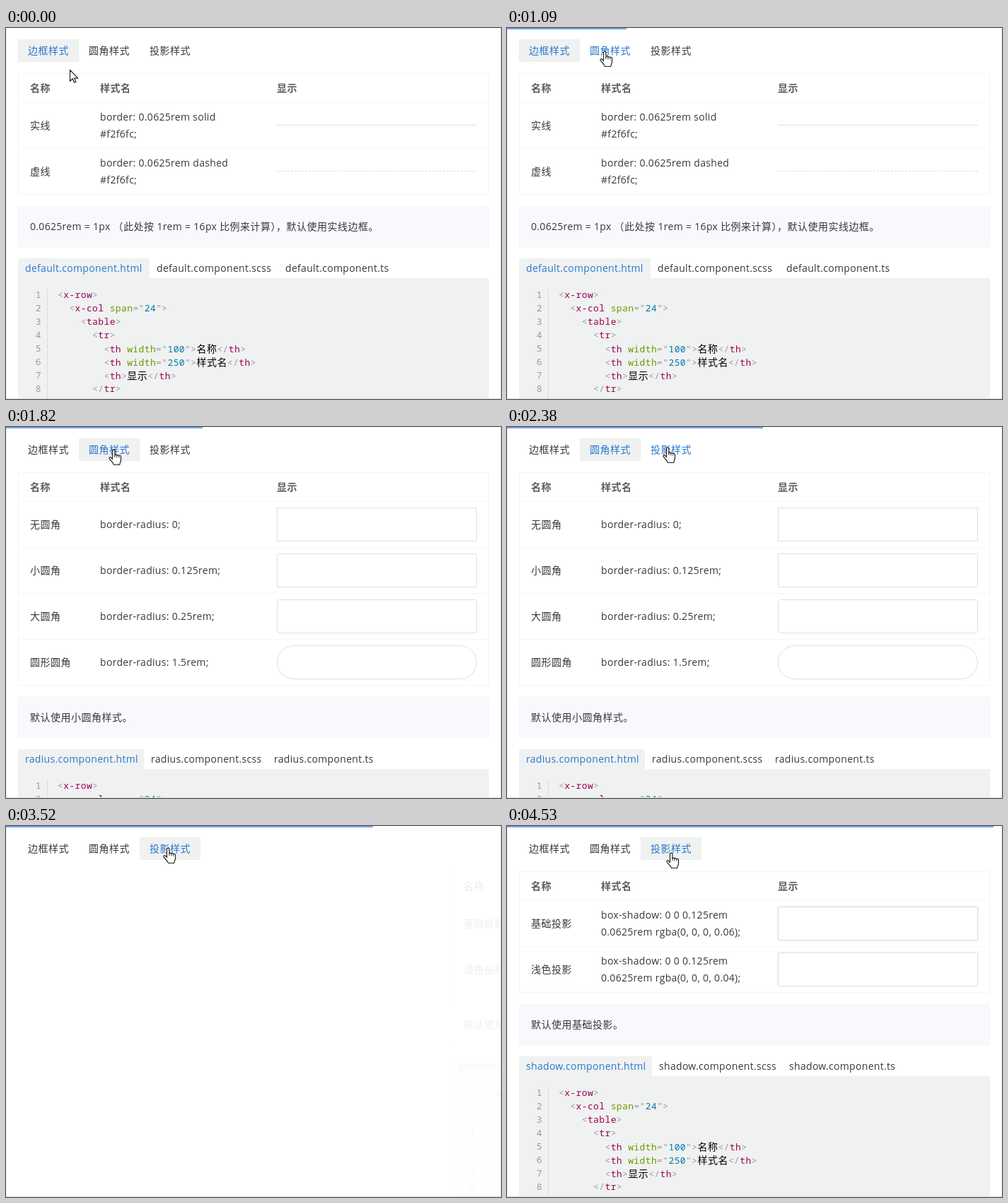
Animation of 700 by 525 pixels, one loop 4610 ms. Source, as an HTML page:

```html
<!DOCTYPE html>
<html lang="zh-CN">
<head>
<meta charset="utf-8">
<title>样式说明</title>
<style>
  html, body { margin: 0; width: 100%; height: 100%; overflow: hidden; background: #fff; }
  #stage { position: relative; width: 700px; height: 525px; overflow: hidden; background: #fff;
    font: 14px/24px "Open Sans", "Noto Sans CJK SC", "Noto Sans CJK", sans-serif; letter-spacing: .5px; color: #383838; }
  #stage div, #stage svg { position: absolute; box-sizing: border-box; }
  #stage svg { overflow: visible; left: 0; top: 0; }
  .text { white-space: pre; }
  .text i { font-style: normal; letter-spacing: .31px; }
  .head { font-weight: 700; color: #5c5c5c; }
  .blue { color: #2878d0; }
  .panel { inset: 0; }
  .table { left: 17px; top: 64px; width: 666px; border: 1px solid #f2f5fa; }
  .rule { left: 17px; width: 666px; height: 1px; background: #f2f5fa; }
  .show { left: 383px; width: 283px; border: 0 solid #dcdfe6; }
  .note { left: 17px; width: 666px; height: 58px; background: #f7f9fd; border: 1px solid #f2f6fc; border-radius: 2px; }
  .fill { background: #f0f1f1; }
  .code { white-space: pre; line-height: 19px; font-size: 13px; letter-spacing: .38px;
    font-family: "Noto Sans Mono", "Noto Sans CJK SC", monospace; color: #999; }
  .num { text-align: right; width: 34px; }
  .tag { color: #905; } .attr { color: #690; } .val { color: #07a; }
  .zh { color: #000; font-size: 14px; letter-spacing: .5px; }
  .tab { top: 16px; width: 86px; height: 32px; border-radius: 2px; }
  .tab span { position: absolute; left: 14px; top: 4px; white-space: nowrap; }
  .tab.on { background: #f0f1f1; box-shadow: inset 0 0 0 1px #eceeee; }
  #dot { width: 8px; height: 8px; border-radius: 50%; background: #2878d0; opacity: .55; filter: blur(.8px); }
  #bar { left: 0; top: 0; height: 2px; background: #74a6e6; }
  #frame { inset: 0; border: 1px solid #ececec; border-top: 0; border-bottom-color: #dcdee0; }
  path { fill: #fff; stroke: #222; stroke-width: 1.2; stroke-linejoin: round; }
  path.line { fill: none; stroke-width: 1; }
</style>
</head>
<body>
<div id="stage">
  <div id="panels"></div>
  <div id="tabs"></div>
  <div id="frame"></div>
  <div id="bar"></div>
  <div id="dot"></div>
  <svg id="arrow" width="12" height="19"><path d="M.5.5v15.8l3.7-3.6 2.3 5.6 2.4-1-2.3-5.4h5.2z"/></svg>
  <svg id="hand" width="18" height="24">
    <path d="M5.5 14.5V2.8a1.7 1.7 0 0 1 3.4 0V9a1.6 1.6 0 0 1 3 .4 1.6 1.6 0 0 1 2.9.6 1.5 1.5 0 0 1 2.7 1v5c0 2.5-1.5 3.5-1.8 6.5H7.5C7 20 3.5 17 1.2 13.8c-.9-1.5.9-2.8 2.2-1.6z"/>
    <path class="line" d="M8.9 9v3M11.9 9.6v2.8M14.8 10.4v2.2"/>
  </svg>
</div>
<script>
const $ = id => document.getElementById(id);
const LOOP = 4610, STEPS = 58, SLIDE = 360;
const tabNames = ['边框样式', '圆角样式', '投影样式'];
const line = 'border-top-width:1px;height:1px;border-top-style:';
const box = 'height:48px;border-width:1px;border-radius:';
const shadow = a => box + `2px;box-shadow:0 0 2px 1px rgba(0,0,0,${a})`;

const pages = [
  { name: 'default', tabs: [17, 203, 385], start: 0,
    note: '0.0625rem = 1px （此处按 1rem = 16px 比例来计算），默认使用实线边框。',
    rows: [['实线', 'border: 0.0625rem solid\n#f2f6fc;', line + 'solid'],
           ['虚线', 'border: 0.0625rem dashed\n#f2f6fc;', line + 'dashed']] },
  { name: 'radius', tabs: [17, 195, 369], start: 1307,
    note: '默认使用小圆角样式。',
    rows: [['无圆角', 'border-radius: 0;', box + '0'],
           ['小圆角', 'border-radius: 0.125rem;', box + '2px'],
           ['大圆角', 'border-radius: 0.25rem;', box + '4px'],
           ['圆形圆角', 'border-radius: 1.5rem;', box + '24px']] },
  { name: 'shadow', tabs: [17, 205, 389], start: 3379,
    note: '默认使用基础投影。',
    rows: [['基础投影', 'box-shadow: 0 0 0.125rem\n0.0625rem rgba(0, 0, 0, 0.06);', shadow(.06)],
           ['浅色投影', 'box-shadow: 0 0 0.125rem\n0.0625rem rgba(0, 0, 0, 0.04);', shadow(.04)]] }
];
const code = ['<x-row>', '  <x-col span="24">', '    <table>', '      <tr>',
  '        <th width="100">名称</th>', '        <th width="250">样式名</th>',
  '        <th>显示</th>', '      </tr>'];

const div = (cls, style, html = '') => `<div class="${cls}" style="${style}">${html}</div>`;
const span = (cls, s) => `<span class="${cls}">${s}</span>`;

// Text block whose vertical middle is y
function text(x, y, s, cls = '') {
  const top = y - 12 * s.split('\n').length;
  return div('text ' + cls, `left:${x}px;top:${top}px`, s.replace(/[ -~]+/g, '<i>$&</i>'));
}

function paint(s) {
  return s.replace(/(<\/?)([\w-]+)|(\w+)="(\d+)"|>|[^\x00-\x7f]+/g, (m, open, tag, attr, val) =>
    tag ? open.replace('<', '&lt;') + span('tag', tag)
    : attr ? span('attr', attr) + '="' + span('val', val) + '"'
    : m === '>' ? '&gt;' : span('zh', m));
}

function buildPage({ name, tabs, note, rows }) {
  const end = 106 + rows.length * 65, top = end + 118;
  let h = div('table', `height:${end - 64}px`);
  h += text(34, 85, '名称', 'head') + text(133, 85, '样式名', 'head') + text(383, 85, '显示', 'head');
  rows.forEach(([title, css, look], i) => {
    const y = 138 + i * 65;
    h += div('rule', `top:${y - 33}px`) + text(34, y, title) + text(133, y, css);
    h += div('show', `top:${look.startsWith(line) ? y - 1 : y - 24}px;${look}`);
  });
  h += div('note', `top:${end + 16}px`) + text(34, end + 45, note);
  h += div('fill', `left:17px;top:${top - 28}px;width:${tabs[1] - 17}px;height:28px;border-radius:2px 2px 0 0`);
  ['html', 'scss', 'ts'].forEach((ext, i) =>
    h += text(tabs[i] + 10, top - 14, `${name}.component.${ext}`, i ? '' : 'blue'));
  h += div('fill', `left:17px;top:${top}px;width:666px;height:300px`);
  h += div('', `left:58px;top:${top + 14}px;width:1px;height:300px;background:#dcdcdc`);
  code.forEach((s, i) => {
    const y = top + 14 + i * 19;
    h += div('code num', `left:16px;top:${y}px`, i + 1) + div('code', `left:73px;top:${y}px`, paint(s));
  });
  return div('panel', '', h);
}

$('panels').style.cssText = 'inset:0';
$('panels').innerHTML = pages.map(buildPage).join('');
$('tabs').innerHTML = tabNames.map((s, i) => div('tab', `left:${17 + 86 * i}px`, span('', s))).join('');
const panels = [...$('panels').children], tabs = [...$('tabs').children];

const slides = panels.map((p, i) => {
  if (!i) return null;
  const a = p.animate([{ transform: 'translateX(666px)', opacity: 0 }, { transform: 'none', opacity: 1 }],
    { duration: SLIDE, easing: 'ease-in-out', fill: 'both' });
  a.pause();
  return a;
});

// [step, ms]: the picture advances in uneven steps
const clock = [[0, 0], [1, 70], [7, 570], [8, 650], [14, 1090], [15, 1180], [20, 1570], [21, 1660], [22, 1740],
  [28, 2220], [30, 2380], [31, 2450], [35, 2790], [36, 2870], [40, 3210], [42, 3360], [43, 3450], [46, 3680],
  [47, 3760], [49, 3910], [50, 3990], [56, 4440], [57, 4530]];
// [step, x, y] of the pointer's hot spot
const path = [[0, 90, 59], [1, 91, 58], [7, 138, 32], [22, 138, 32],
  [28, 220, 27], [30, 227, 28], [35, 229, 30], [56, 229, 30], [57, 232, 37]];
const presses = [[15, 16], [39, 41]];

function track(keys, n, k) {
  const j = keys.findIndex(r => r[0] >= n);
  if (keys[j][0] === n) return keys[j][k];
  const a = keys[j - 1], b = keys[j];
  return a[k] + (b[k] - a[k]) * (n - a[0]) / (b[0] - a[0]);
}
const times = Array.from({ length: STEPS }, (_, n) => track(clock, n, 1));

function draw(n) {
  const t = times[n];
  const x = Math.round(track(path, n, 1)), y = Math.round(track(path, n, 2));
  const page = pages.filter(p => t >= p.start).length - 1;
  const over = y >= 16 && y < 48 && x >= 17 && x < 275 ? Math.floor((x - 17) / 86) : -1;
  const down = presses.some(([a, b]) => n >= a && n <= b);

  panels.forEach((p, i) => {
    p.style.visibility = i === page ? 'visible' : 'hidden';
    if (slides[i]) slides[i].currentTime = Math.max(0, Math.min(SLIDE, t - pages[i].start));
  });
  tabs.forEach((el, i) => {
    el.className = 'tab' + (i === page ? ' on' : '') + (i === page || i === over ? ' blue' : '');
    el.firstChild.style.transform = down && i === over ? 'translate(1px,1px)' : 'none';
  });
  $('bar').style.width = Math.round(700 * n / STEPS) + 'px';
  $('dot').style.cssText = `left:${x - 5}px;top:${y - 5}px;display:${down ? 'block' : 'none'}`;
  $('arrow').style.display = over < 0 ? 'block' : 'none';
  $('hand').style.display = over < 0 ? 'none' : 'block';
  $('arrow').style.transform = `translate(${x}px,${y}px)`;
  $('hand').style.transform = `translate(${x - 7}px,${y}px)`;
}

const began = performance.now();
let last = -1;
function tick() {
  const t = (performance.now() - began) % LOOP;
  const n = times.filter(s => s <= t).length - 1;
  if (n !== last) draw(last = n);
  requestAnimationFrame(tick);
}
tick();
</script>
</body>
</html>
```
